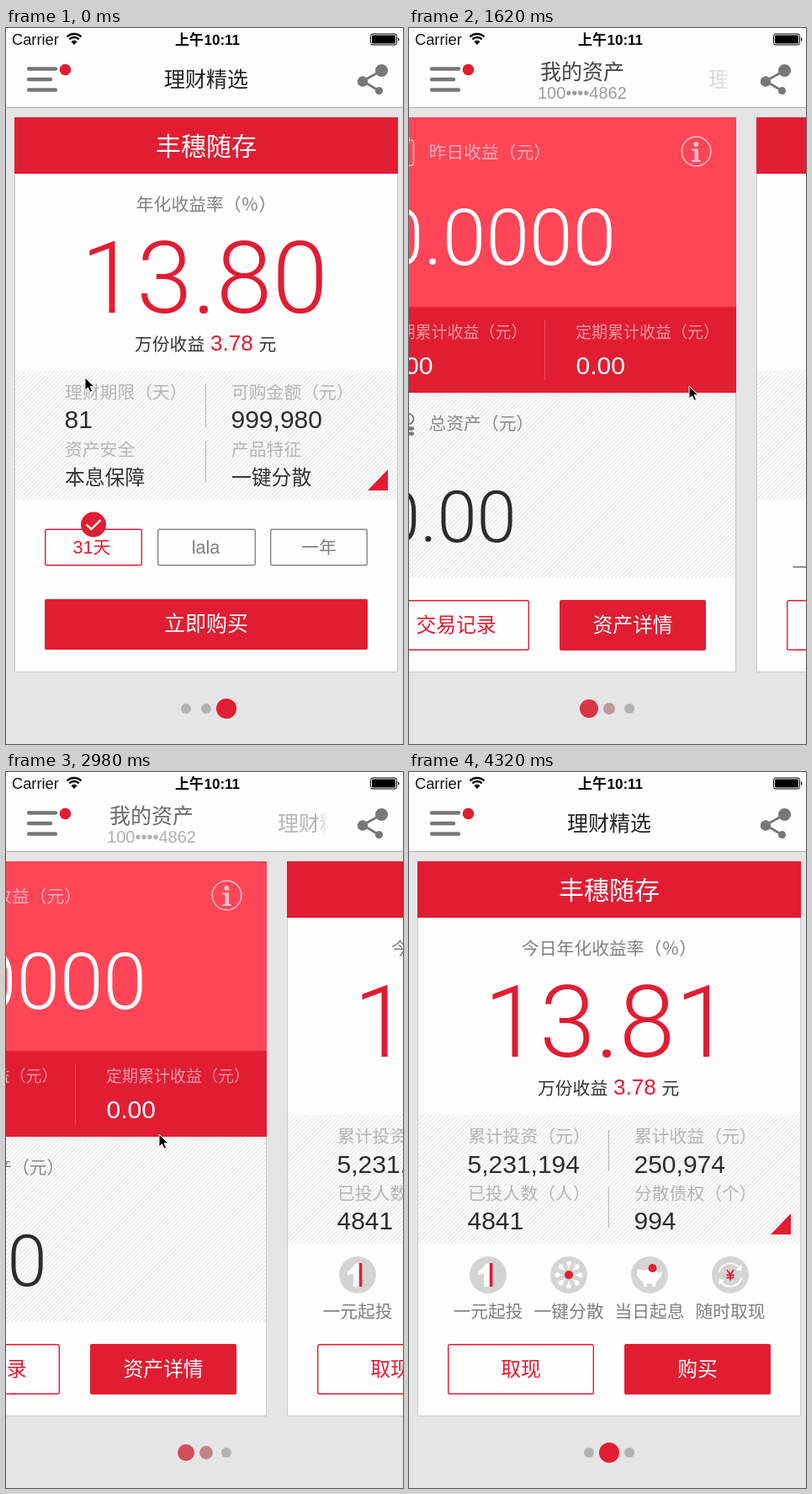
An HTML page that plays this animation: 472x850 px, repeating every 4630 ms.

```html
<!DOCTYPE html>
<html lang="zh-CN">
<head>
<meta charset="utf-8">
<title>理财精选</title>
<style>
  html, body { margin: 0; width: 100%; height: 100%; overflow: hidden; background: #e5e5e5; }
  svg { display: block; width: 472px; height: 850px; }
  text { font-family: "Noto Sans CJK SC", "Noto Sans CJK", sans-serif; font-weight: 300; white-space: pre; }
  .num { font-family: "Liberation Sans", Arial, sans-serif; font-weight: 400; }
  .big { font-family: Roboto, "Liberation Sans", sans-serif; font-weight: 300; }
  .mid { font-weight: 500; }
  .bold { font-family: "Liberation Sans", "Noto Sans CJK SC", sans-serif; font-weight: 700; }
</style>
</head>
<body>
<svg viewBox="0 0 472 850" id="stage">
  <defs>
    <pattern id="hatch" width="5" height="5" patternUnits="userSpaceOnUse">
      <rect width="5" height="5" fill="#fdfdfd"/>
      <path d="M-1 1l2-2M0 5l5-5M4 6l2-2" stroke="#dedede" stroke-width=".9"/>
    </pattern>
    <linearGradient id="fade">
      <stop offset="0" stop-color="#000"/><stop offset=".04" stop-color="#fff"/>
      <stop offset=".96" stop-color="#fff"/><stop offset="1" stop-color="#000"/>
    </linearGradient>
    <mask id="edges" maskUnits="userSpaceOnUse" x="94" y="30" width="288" height="62">
      <rect x="94" y="30" width="288" height="62" fill="url(#fade)"/>
    </mask>
  </defs>
  <rect width="472" height="850" fill="#e5e5e5"/>
  <g id="pages"></g>
  <g id="dots"></g>
  <g id="bar"></g>
  <path id="cursor" d="M0 0V15L3.5 11.8L6 17.2L8.6 16L6.2 10.8H11Z" fill="#000" stroke="#fff" stroke-width="1"/>
</svg>
<script>
const RED = '#e11d33', PINK = '#ff4658', GRAY = '#808080', PALE = '#b4b4b4', INK = '#2c2c2c';
const LOOP = 4630, PITCH = 480, LABEL = 20.8;
const $ = id => document.getElementById(id);

// Drawing helpers
const text = (x, y, size, fill, str, cls = '', anchor = 'start') =>
  `<text x="${x}" y="${y}" font-size="${size}" fill="${fill}" class="${cls}" text-anchor="${anchor}">${str}</text>`;
const center = (x, y, size, fill, str, cls) => text(x, y, size, fill, str, cls, 'middle');
const rect = (x, y, w, h, fill, extra = '') =>
  `<rect x="${x}" y="${y}" width="${w}" height="${h}" fill="${fill}" ${extra}/>`;
const circle = (x, y, r, fill, extra = '') => `<circle cx="${x}" cy="${y}" r="${r}" fill="${fill}" ${extra}/>`;
const line = (d, stroke, width, extra = '') =>
  `<path d="${d}" fill="none" stroke="${stroke}" stroke-width="${width}" ${extra}/>`;
const shape = (d, fill) => `<path d="${d}" fill="${fill}"/>`;
const outline = (x, y, w, h, stroke) =>
  rect(x + .7, y + .7, w - 1.4, h - 1.4, '#fefefe', `rx="2" stroke="${stroke}" stroke-width="1.4"`);
const solid = (x, y, w, h) => rect(x, y, w, h, RED, 'rx="2"');

const card = body => rect(10.5, 106.5, 455, 658, '#fefefe', 'stroke="#c9c9c9"') + body;

const twoButtons = (left, right) =>
  outline(46, 679, 174, 60, RED) + solid(256, 679, 174, 60) +
  center(133, 717, 23.8, RED, left) + center(343, 717, 23.8, '#fff', right);

const product = (label, rate, divider) =>
  rect(10, 106, 456, 67, RED) + center(238, 150.5, 30, '#fff', '丰穗随存') +
  center(238, 216.5, LABEL, GRAY, label) +
  text(89, 338, 119.5, RED, rate, 'big') +
  text(153, 382.5, LABEL, '#333', '万份收益') + text(243, 383, 26, RED, '3.78', 'num') +
  text(300.5, 382.5, LABEL, '#333', '元') +
  rect(11, 407, 454, 153, 'url(#hatch)') +
  line(divider, '#b5b5b5', 1) + shape('M454 524V549H430Z', RED);

const labels = list => list.map((s, i) =>
  text(i % 2 ? 268 : 70, i < 2 ? 440.4 : 507.6, LABEL, PALE, s)).join('');

// Icons
const calendar = line('M50 133h-.5a3 3 0 0 0-3 3v24a3 3 0 0 0 3 3h30a3 3 0 0 0 3-3v-24a3 3 0 0 0-3-3h-1' +
  'M58 133h13M52 158.500h25', '#ffb5bc', 1.6) +
  [54, 75].map(x => rect(x - 2.2, 129, 4.4, 8, 'none', 'rx="2.2" stroke="#ffb5bc" stroke-width="1.4"')).join('') +
  [[54, 5], [60, 8], [66, 6], [72, 11]].map(([x, h]) => rect(x, 157 - h, 3.2, h, '#ffb5bc')).join('');

const info = circle(418.5, 146.500, 17.3, 'none', 'stroke="#ffb5bc" stroke-width="1.7"') +
  circle(418.3, 138, 2.9, '#ffc4ca') +
  shape('M413 143.500H421V156.500L424 157.500V159H413V157.500L416.500 156.500V146L413 145.200Z', '#ffc4ca');

const coins = [0, 1, 2, 3, 4].map(i => rect(46, 455 + i * 6.1, 17, 4.4, '#777', 'rx="2.2"')).join('') +
  [3, 4].map(i => rect(66, 455 + i * 6.1, 17, 4.4, '#777', 'rx="2.2"')).join('') +
  '<ellipse cx="74.500" cy="464" rx="8" ry="6.500" fill="#fdfdfd" stroke="#777" stroke-width="1.800"/>' +
  line('M71.500 460L74.500 463.500L77.500 460M74.500 463V469M71 464h7M71 466.500h7', '#777', 1.1);

const turn = (n, x, y, body) => Array.from({ length: n }, (_, i) =>
  `<g transform="rotate(${i * 360 / n} ${x} ${y})">${body}</g>`).join('');

const features = [
  ['一元起投', shape('M91 583.500H95V611H89V595.500L82 597V592.500Q88 590 91 583.500Z', '#fff') + rect(96, 583, 3.4, 28, RED)],
  ['一键分散', turn(8, 190, 597, line('M190 590V584', '#fff', 1.6) + circle(190, 583.500, 3, '#fff')) + circle(190, 597, 5, RED)],
  ['当日起息', '<ellipse cx="286" cy="599" rx="12" ry="8.500" fill="#fff"/>' +
    shape('M272 590L280 592L276 602L271 599ZM278 604H283V611H279ZM289 604H294L293 611H289ZM296 595L301 593L300 599L296 602Z', '#fff') +
    circle(289.5, 589, 5, RED)],
  ['随时取现', turn(2, 382, 597, line('M368.500 594A14 14 0 0 1 393 588.500', '#fff', 2) + shape('M395.500 585V592.500L388.500 591Z', '#fff')) +
    line('M378 591L382 596.500L386 591M382 596V603.500M377.500 597.200h9M377.500 600.400h9', RED, 1.9)]
];

// Pages
const assets = card(
  rect(10, 106, 456, 225, PINK) + rect(10, 331, 456, 102, RED) + rect(11, 433, 454, 220, 'url(#hatch)') +
  calendar + text(100.5, 154.5, LABEL, '#ffacb5', '昨日收益（元）') + info +
  text(43, 281, 93, '#fff', '0.0000', 'big') +
  line('M238.500 347V418', '#e8505f', 1) +
  [[46.5, '活期'], [275, '定期']].map(([x, kind]) =>
    text(x, 368, 19, '#f19aa4', kind + '累计收益（元）') + text(x + .5, 411, 30, '#fff', '0.00', 'num')).join('') +
  coins + text(100.5, 477, LABEL, '#888', '总资产（元）') +
  text(43, 610, 85, INK, '0.00', 'big') +
  twoButtons('交易记录', '资产详情'));

const current = card(
  product('今日年化收益率（％）', '13.81', 'M237.500 425V474M237.500 492V541') +
  labels(['累计投资（元）', '累计收益（元）', '已投人数（人）', '分散债权（个）']) +
  ['5,231,194', '250,974', '4841', '994'].map((s, i) =>
    text(i % 2 ? 267.5 : 69.5, i < 2 ? 475.5 : 542.5, 30, INK, s, 'num')).join('') +
  features.map(([name, icon], i) => {
    const x = 94 + i * 96;
    return circle(x, 597, 22, '#d4d4d4') + icon + center(x, 648, LABEL, GRAY, name);
  }).join('') +
  twoButtons('取现', '购买'));

const fixed = card(
  product('年化收益率（％）', '13.80', 'M237.500 422V474M237.500 490V540') +
  labels(['理财期限（天）', '可购金额（元）', '资产安全', '产品特征']) +
  text(69.5, 475, 30, INK, '81', 'num') + text(267.5, 475, 30, INK, '999,980', 'num') +
  text(70, 541.5, 23.8, '#333', '本息保障') + text(268, 541.5, 23.8, '#333', '一键分散') +
  outline(46, 594.5, 116, 44, RED) + outline(180, 594.5, 117, 44, '#858585') + outline(314, 594.5, 116, 44, '#858585') +
  text(79.5, 624, 21.5, RED, '31', 'num') + text(103.5, 624, LABEL, RED, '天') +
  center(237.5, 624, 21.5, GRAY, 'lala', 'num') + center(372, 624, LABEL, GRAY, '一年') +
  circle(104, 589.5, 15, RED) + line('M95.500 589.500L101.500 595L112.500 584', '#fff', 2.4) +
  solid(46, 678, 384, 60) + center(238, 716, 25, '#fff', '立即购买'));

$('pages').innerHTML = [assets, current, fixed].map((p, i) =>
  `<g transform="translate(${i * PITCH})">${p}</g>`).join('');

$('dots').innerHTML = [214, 238, 262].map(x => circle(x, 808, 6, PALE)).join('');

// Status and navigation bars
const arc = (r, w) => {
  const d = r * Math.SQRT1_2;
  return line(`M${81 - d} ${19 - d}A${r} ${r} 0 0 1 ${81 + d} ${19 - d}`, '#000', w);
};
$('bar').innerHTML =
  rect(0, 0, 472, 94, '#fefefe') + rect(0, 94, 472, 1, '#adadad') +
  text(7, 20, 18.3, '#111', 'Carrier', 'num') +
  arc(12, 2.4) + arc(8, 2.4) + shape('M81 20L77.500 16.300A5 5 0 0 1 84.500 16.300Z', '#000') +
  text(201, 20, 17, '#000', '上午', 'bold') + text(235.5, 20, 17, '#000', '10:11', 'bold') +
  rect(433.5, 7, 31, 13, 'none', 'rx="2.500" stroke="#000"') + rect(435, 8.500, 28, 10, '#000', 'rx="1.200"') +
  shape('M466 11Q469 13.500 466 16Z', '#000') +
  line('M27 48.500H59M27 61H53M27 73.500H59', '#777', 4.4, 'stroke-linecap="round"') + circle(70.5, 49.5, 6.8, RED) +
  line('M446.500 50.500L424 63L443.500 74.500', '#777', 2.8) +
  circle(446.5, 50.5, 7.5, '#777') + circle(424, 63.5, 6.2, '#777') + circle(443.5, 74.5, 4.6, '#777') +
  '<g mask="url(#edges)">' +
  `<g class="title">${center(238, 60.5, 25, '#222', '我的资产', 'mid')}${center(238, 84, 20, '#8c8c8c', '100••••4862', 'num')}</g>` +
  `<g class="title">${center(238, 70, 25, '#222', '理财精选', 'mid')}</g></g>`;

const titles = document.querySelectorAll('.title');
const dots = $('dots').children;

// Smooth curve through [time, value] points that never overshoots
function curve(points) {
  const slope = i => (points[i + 1][1] - points[i][1]) / (points[i + 1][0] - points[i][0]);
  const tangent = i => {
    if (i === 0 || i === points.length - 1) return 0;
    const a = slope(i - 1), b = slope(i);
    return a * b > 0 ? 2 * a * b / (a + b) : 0;
  };
  return t => {
    const last = points.length - 1;
    if (t <= points[0][0]) return points[0][1];
    if (t >= points[last][0]) return points[last][1];
    const i = points.findIndex(p => p[0] > t) - 1;
    const [t0, v0] = points[i], [t1, v1] = points[i + 1];
    const w = t1 - t0, u = (t - t0) / w, r = 1 - u;
    return v0 * (1 + 2 * u) * r * r + v1 * u * u * (3 - 2 * u) +
      w * u * r * (tangent(i) * r - tangent(i + 1) * u);
  };
}

const scroll = curve([
  [172, 960], [230, 945], [410, 830], [520, 730], [700, 575], [870, 505], [1040, 483], [1160, 480],
  [1332, 480], [1390, 452], [1506, 290], [1564, 165], [1622, 77], [1738, 18], [1912, 0],
  [2150, 0], [2202, 8], [2376, 43], [2692, 92], [2982, 156], [3272, 262], [3562, 376], [3678, 440], [3852, 480]
]);
const cursorX = curve([
  [172, 94], [230, 109], [410, 224], [530, 285], [700, 300], [1000, 170], [1220, 107],
  [1332, 107], [1390, 135], [1506, 275], [1564, 318], [1622, 333], [1912, 359], [2028, 344],
  [2150, 344], [2202, 331], [2376, 296], [2692, 247], [2982, 182], [3272, 77], [3562, -37],
  [3910, -37], [3968, 208], [4316, 455]
]);
const cursorY = curve([
  [172, 415], [600, 422], [1220, 425], [1622, 425], [1912, 427], [2028, 430],
  [3910, 430], [3968, 467], [4316, 862]
]);

// The picture advances in 58 ms steps, with one shift in phase
function held(t) {
  const start = t < 2690 ? 222 : 2742;
  return start + 8 + Math.floor((t - start) / 58) * 58;
}

const mix = (a, b, p) => Math.round(a + (b - a) * p);

function draw() {
  const t = held(performance.now() % LOOP);
  const s = scroll(t), page = s / PITCH, shown = Math.min(page, 1);

  $('pages').setAttribute('transform', `translate(${-s})`);
  titles.forEach((el, i) => {
    el.setAttribute('transform', `translate(${(i - shown) * 200})`);
    el.setAttribute('opacity', 1 - Math.abs(i - shown));
  });
  [...dots].forEach((dot, i) => {
    const p = Math.max(0, 1 - Math.abs(i - page));
    dot.setAttribute('r', 6 + 6 * p);
    dot.setAttribute('fill', `rgb(${mix(178, 225, p)},${mix(178, 29, p)},${mix(178, 51, p)})`);
  });
  $('cursor').setAttribute('transform', `translate(${cursorX(t)} ${cursorY(t)})`);
  requestAnimationFrame(draw);
}
draw();
</script>
</body>
</html>
```
